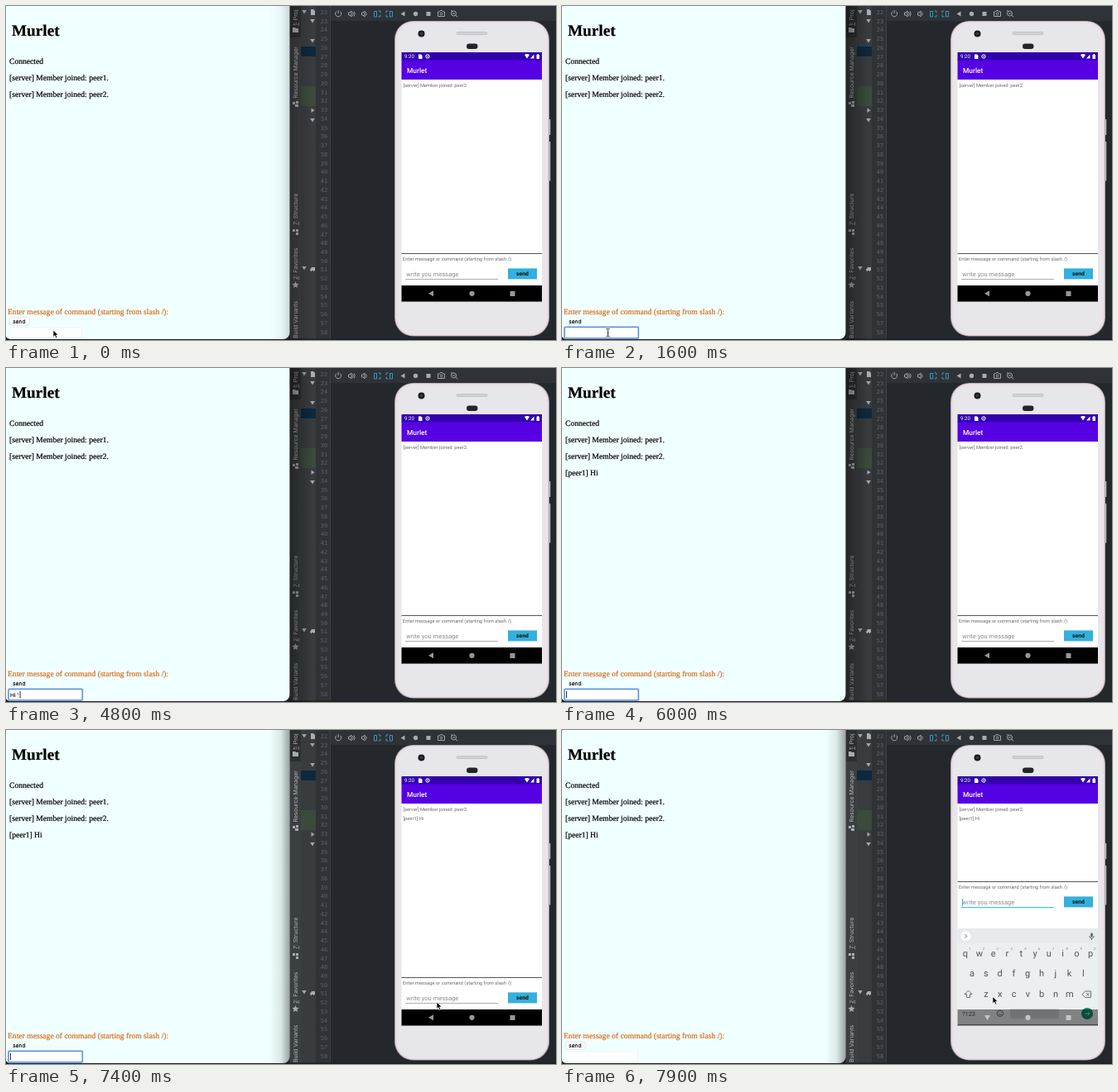
Animation of 664x404 px, one loop 8000 ms. Source, as an HTML page:

```html
<!DOCTYPE html>
<html lang="en">
<head>
<meta charset="utf-8">
<title>Chat demo</title>
<style>
html, body { margin: 0; width: 100%; height: 100%; overflow: hidden; background: #1d1f22; }
svg { display: block; width: 664px; height: 404px; }
text { white-space: pre; text-rendering: geometricPrecision; }
.serif { font-family: "Liberation Serif", "Times New Roman", serif; font-size: 9.6px; fill: currentColor; stroke: currentColor; stroke-width: .22px; }
.ui { font-family: Inter, sans-serif; font-size: 6.6px; stroke: #000; stroke-width: .12px; }
.side { font-family: Inter, sans-serif; font-size: 7px; fill: #b4b7b9; }
.num { font-family: "DejaVu Sans Mono", monospace; font-size: 6.8px; fill: #606468; text-anchor: end; }
.phone { font-family: Roboto, sans-serif; font-size: 5.8px; fill: #6b6b6b; }
.key { font-family: Roboto, sans-serif; font-size: 11px; fill: #4f5358; text-anchor: middle; }
.hint { font-family: Roboto, sans-serif; font-size: 4.2px; fill: #80868b; text-anchor: middle; }
</style>
</head>
<body>
<svg id="stage" viewBox="0 0 664 404">
  <defs>
    <linearGradient id="leftShade">
      <stop offset="0" stop-color="#000" stop-opacity="0"/>
      <stop offset=".55" stop-color="#000" stop-opacity=".09"/>
      <stop offset="1" stop-color="#000" stop-opacity=".38"/>
    </linearGradient>
    <linearGradient id="rightShade">
      <stop offset="0" stop-color="#000" stop-opacity=".42"/>
      <stop offset="1" stop-color="#000" stop-opacity="0"/>
    </linearGradient>
    <clipPath id="screenClip"><rect x="477.5" y="56" width="169.5" height="301.5"/></clipPath>
    <clipPath id="pageClip"><path d="M0 0H342.500V395a8 8 0 0 1-8 8H5a6 6 0 0 1-5-3Z"/></clipPath>
  </defs>

  <g id="ide">
    <rect x="342" width="322" height="404" fill="#24282c"/>
    <rect x="391" width="273" height="18" fill="#2f3236"/>
    <rect x="342" width="14" height="404" fill="#3c3f41"/>
    <rect x="342" width="14" height="38" fill="#2d2f31"/>
    <rect x="356" width="18" height="404" fill="#393c3f"/>
    <rect x="356" y="49" width="18" height="12" fill="#0d293e"/>
    <rect x="356" y="97" width="18" height="24" fill="#3b4a3b"/>
    <rect x="374" width="17.5" height="404" fill="#303335"/>
    <rect x="391" width="1" height="404" fill="#3e4144"/>
    <rect x="342" y="402.5" width="322" height="1.5" fill="#1d1f22"/>
  </g>

  <g id="tools" fill="none" stroke="#a9acaf" stroke-width=".95">
    <path d="M399 6.600a3.500 3.500 0 1 0 4.400 0M401.200 5v4"/>
    <path d="M413.500 8v3h1.500l2 2v-7l-2 2ZM418.500 7.500q1.500 2 0 4M420 6.500q2.500 3 0 6"/>
    <path d="M429.500 8v3h1.500l2 2v-7l-2 2ZM434.500 7.500q1.500 2 0 4"/>
    <g stroke="#3a9cc4">
      <path d="M444.500 6.500h3v6.500h-3ZM449.500 6h2.500v2.500M452 10.500v2.500h-2.500"/>
      <path d="M463.500 6.500h3v6.500h-3ZM461.500 6h-2.500v2.500M459 10.500v2.500h2.500"/>
    </g>
    <g fill="#a9acaf" stroke="none">
      <path d="M481.500 6.500v6l-5-3Z"/>
      <circle cx="494.500" cy="9.500" r="2.700"/>
      <rect x="507.500" y="7" width="5" height="5"/>
    </g>
    <path d="M521.500 7h2l1-1.500h2l1 1.500h2v5.500h-8Z"/><circle cx="525.500" cy="9.500" r="1.300"/>
    <circle cx="540.500" cy="9" r="3"/><path d="M542.800 11.300l2.500 2M539 9h3M537 5.500l2 1"/>
  </g>

  <g id="body">
    <path d="M655 137h2.200v19H655ZM655 164h2.200v47.500H655Z" fill="#c6c2c8"/>
    <rect x="469" y="18" width="187" height="381.500" rx="22.500" fill="#a8a2a9"/>
    <rect x="470" y="18.700" width="185" height="380" rx="21.700" fill="#e9dce2"/>
    <rect x="472" y="20.500" width="181" height="376.500" rx="20" fill="#e7e7eb"/>
    <circle cx="501.500" cy="33.500" r="4" fill="#1c1d22"/>
    <circle cx="501.500" cy="33.500" r="1.500" fill="#3d4150"/>
    <rect x="544" y="31.500" width="37" height="3" rx="1.500" fill="#d3d2d6" stroke="#b3b2b7" stroke-width=".6"/>
    <rect x="556" y="45.500" width="13.500" height="6.500" rx="3.200" fill="#24252a"/>
  </g>

  <g clip-path="url(#screenClip)">
    <rect x="477" y="56" width="171" height="302" fill="#fff"/>
    <rect x="477" y="56" width="171" height="10" fill="#3200ad"/>
    <rect x="477" y="65.400" width="171" height="23.600" fill="#5600e4"/>
    <g fill="#fff">
      <path d="M498 58.500h3l1.500 1.500v4H498Z"/>
      <circle cx="509" cy="61" r="2.200" fill="none" stroke="#fff"/><circle cx="509" cy="61" r=".8"/>
      <path d="M626 59q3-2 6 0l-3 4.500ZM633 63.500h4.500v-5ZM640.500 59h1v-1h1.500v1h1v5h-3.500Z"/>
    </g>
    <g id="chat"></g>
    <g id="form"></g>
    <g id="keys"></g>
    <rect id="navBar" x="477" y="338" width="171" height="20"/>
    <g id="nav" fill="#969799">
      <path id="back"/>
      <circle cx="562.500" cy="347.800" r="3.100"/>
      <rect x="608.500" y="345" width="6" height="6"/>
    </g>
    <rect x="477" y="356.500" width="171" height="1" fill="#111"/>
  </g>

  <g id="web">
    <path d="M0 394H342.500V404H0Z" fill="#1d1f22"/>
    <g clip-path="url(#pageClip)">
      <rect width="343" height="404" fill="#f0ffff"/>
      <g id="page"></g>
      <rect id="button" x="4" y="377" width="24" height="9" rx="2" fill="#fff" stroke="#c6d0d0" stroke-width=".5"/>
      <rect x="4" y="389" width="87.500" height="12" fill="#fff" stroke="#e1eaea" stroke-width=".5"/>
      <rect id="ring" x="3" y="388.300" width="89.300" height="13.500" rx="1" fill="#fff" stroke="#6495e6" stroke-width="1.700"/>
      <rect id="caret" y="391" width=".9" height="8.200" fill="#111"/>
      <rect id="shadeL" x="318" width="25" height="404" fill="url(#leftShade)"/>
    </g>
    <rect id="shadeR" x="342.500" width="27" height="404" fill="url(#rightShade)"/>
  </g>

  <path id="arrow" d="M0 0V8.400L2 6.600L3.400 9.700L4.900 9L3.500 6H6.100Z" fill="#000" stroke="#fff" stroke-width=".7"/>
  <path id="beam" d="M-2-4.700Q0-4.700 0-3.500Q0-4.700 2-4.700M0-3.500V4M-2 5Q0 5 0 3.800Q0 5 2 5M-1 1H1" fill="none" stroke="#222" stroke-width=".9"/>
</svg>
<script>
const NS = "http://www.w3.org/2000/svg";
const LOOP = 8000, STEP = 100, LIFT = -116;
const $ = id => document.getElementById(id);

function add(parent, tag, attrs) {
  const el = document.createElementNS(NS, tag);
  for (const k in attrs) el.setAttribute(k, attrs[k]);
  return parent.appendChild(el);
}
function label(parent, x, y, str, cls, extra) {
  const el = add(parent, "text", { x, y, class: cls, ...extra });
  el.textContent = str;
  return el;
}
const show = (el, on) => el.setAttribute("visibility", on ? "visible" : "hidden");
const place = (el, x, y) => el.setAttribute("transform", `translate(${x} ${y})`);

// Latest value whose start time has passed
const latest = (list, t) => list.filter(k => k[0] <= t).pop();
const during = (t, a, b) => t >= a && t < b;

// Web page
const page = $("page");
label(page, 7, 36.2, "Murlet", "serif", { style: "font-size:19.2px;font-weight:bold" });
label(page, 4, 69.5, "Connected", "serif");
label(page, 4, 89.8, "[server] Member joined: peer1.", "serif");
label(page, 4, 110, "[server] Member joined: peer2.", "serif");
const webHi = label(page, 4, 130, "[peer1] Hi", "serif");
label(page, 2, 373, "Enter message of command (starting from slash /):", "serif", { style: "color:#d9701f" });
const web = $("caret").parentNode;
label(web, 8.2, 384, "send", "ui");
const typed = label(web, 5, 397.8, "", "ui");

// Side bar and gutter
const ide = $("ide");
[["1: Proj", 24], ["Resource Manager", 111.5], ["7: Structure", 265],
 ["2: Favorites", 331], ["Build Variants", 402]].forEach(([s, y]) => {
  label(ide, 0, 0, s, "side", { transform: `translate(352 ${y}) rotate(-90)` });
  if (/^\d/.test(s)) add(ide, "rect", { x: 353, y: y - 4, width: .6, height: 4, fill: "#b4b7b9" });
});
["M346 26h3l1 1h3v5h-7Z", "M346 116h3v3h-3ZM350 115h3v3h-3ZM349 119h4v3h-4Z",
 "M346 270h3v3h-3ZM350 270h3v3h-3ZM350 274h3v3h-3Z",
 "M349.500 333l1.200 2.800 3 .2-2.300 2 .7 3-2.600-1.600-2.600 1.600.7-3-2.300-2 3-.2Z",
 "M368 4h3l2 2v5h-5Z", "M367 319l2-3h4v4h-1v1h-1v-1h-2v1h-1Z"]
  .forEach(d => add(ide, "path", { d, fill: "#a9adb0" }));
[[360, 7], [370, 18], [370, 42], [370, 138], [360, 317]]
  .forEach(([x, y]) => add(ide, "path", { d: `M${x - 2.8} ${y - 2}h5.600l-2.800 4.500Z`, fill: "#a2a6a9" }));
add(ide, "path", { d: "M368.500 123.500v5.600l4-2.800Z", fill: "#a2a6a9" });
for (let n = 22; n <= 58; n++) label(ide, 388, 10 + (n - 22) * 10.74, n, "num");

// Phone app
const chat = $("chat"), form = $("form");
label(chat, 481, 63.2, "9:20", "phone", { style: "font-size:6.2px;fill:#fff" });
label(chat, 484, 80.6, "Murlet", "phone", { style: "font-size:8.4px;font-weight:500;fill:#fff" });
label(chat, 479.5, 97.6, "[server] Member joined: peer2.", "phone");
const phoneHi = label(chat, 479.5, 109.2, "[peer1] Hi", "phone");
add(form, "rect", { x: 477, y: 299, width: 171, height: 1, fill: "#555" });
label(form, 479, 307.6, "Enter message or command (starting from slash /):", "phone");
label(form, 483.3, 327.1, "write you message", "phone", { style: "font-size:7.55px;fill:#8b8b8b" });
const line = add(form, "rect", { x: 482, y: 330, width: 112 });
const mark = add(form, "rect", { x: 483, y: 320, width: 1, height: 9, fill: "#12c9b0" });
add(form, "rect", { x: 606, y: 317.4, width: 35, height: 13, fill: "#33b0dc" });
label(form, 623.5, 326.4, "send", "phone", { style: "font-size:6.8px;font-weight:700;fill:#111;text-anchor:middle" });

// Keyboard, drawn at its resting place
const keys = $("keys");
add(keys, "rect", { x: 477, y: 222, width: 171, height: 140, fill: "#eceff1" });
add(keys, "rect", { x: 477, y: 222, width: 171, height: 18, fill: "#e6eaed" });
add(keys, "circle", { cx: 487.5, cy: 231.3, r: 6, fill: "#fff" });
const outline = d => add(keys, "path", { d, fill: "none", stroke: "#5f6368", "stroke-width": .9 });
outline("M486.500 229l2.200 2.300-2.200 2.300");
outline("M636.800 231q0 3 2.700 3t2.700-3M639.500 234v2");
add(keys, "rect", { x: 638.2, y: 227.5, width: 2.6, height: 5, rx: 1.3, fill: "#5f6368" });
[["qwertyuiop", 487, 256], ["asdfghjkl", 495, 280.2], ["zxcvbnm", 512, 304.8]].forEach(([row, x, y], r) => {
  [...row].forEach((c, i) => {
    label(keys, x + i * 16.8, y, c, "key");
    if (!r) label(keys, x + i * 16.8 + 5.2, 248.3, (i + 1) % 10, "hint");
  });
});
outline("M490.500 297l4.500 4.500h-2.500v4h-4v-4h-2.500Z");
outline("M631.500 298h7v7.500h-7l-3.500-3.750ZM633 300l3.500 3.500M636.500 300l-3.500 3.500");
label(keys, 491, 327.6, "?123", "key", { style: "font-size:7.4px" });
outline("M525.200 324.800a3.700 3.700 0 1 0 7.400 0a3.700 3.700 0 1 0-7.400 0M527 325.500q2 2.500 4 0M527.300 323.500h.8M529.700 323.500h.8");
add(keys, "rect", { x: 541, y: 319, width: 59, height: 12, rx: 1.5, fill: "#cfd4d8" });
add(keys, "circle", { cx: 634, cy: 325, r: 7, fill: "#0f8a6e" });
add(keys, "path", { d: "M631 325h6m-2.300-2.300l2.300 2.300-2.300 2.300", fill: "none", stroke: "#d5dcda", "stroke-width": .9 });

const typing = [[0, "", 5], [2300, "H", 10.6], [2800, "Hi", 11.9], [4000, "Hi ", 13.7],
  [4800, "Hi '", 16.6], [5800, "Hi ", 13.7], [6000, "", 5]];
const blinkOn = [[1100, 1600], [2100, 3400], [3900, 4500], [4800, 5300], [5800, 6500], [7000, 7500]];
const slide = [[0, 140], [7700, 74], [7800, 42], [7900, 18]];
const dim = [[0, 1], [7700, .9], [7800, .65], [7900, .46]];
// Strength of the shadow cast over the web page; the other side gets the rest
const shade = [[0, .4], [100, .2], [200, 0], [7200, .4], [7300, .8], [7400, 1]];

function pointer(t) {
  if (t < 300) return ["arrow", 57, 392];
  if (t < 800) return ["beam", 55.3, 391];
  if (t < 2300) return ["beam", 55.5, t < 900 ? 393 : 395];
  if (t < 6400) return ["none", 0, 0];
  if (t < 6500) return ["beam", 57, 394];
  const p = Math.min(1, (t - 6400) / 600), e = p * p * (3 - 2 * p);
  const rise = Math.min(1, Math.max(0, (t - 7400) / 300));
  return ["arrow", 57 + 463 * e, 394 - 65 * e - 6.5 * rise];
}

function draw(time) {
  const t = Math.floor((time % LOOP) / STEP) * STEP;
  const focused = during(t, 1100, 7600);
  const tapped = t >= 7600, open = t >= 7700;

  const [, str, cx] = latest(typing, t);
  typed.textContent = str;
  $("caret").setAttribute("x", cx);
  show($("caret"), blinkOn.some(([a, b]) => during(t, a, b)));
  show($("ring"), focused);
  show($("button"), !focused);
  const cast = latest(shade, t)[1];
  $("shadeL").setAttribute("opacity", cast);
  $("shadeR").setAttribute("opacity", 1 - cast);
  show(webHi, t >= 6000);
  show(phoneHi, t >= 6100);

  place(form, 0, open ? LIFT : 0);
  line.setAttribute("height", tapped ? 1.2 : .8);
  line.setAttribute("fill", tapped ? "#2fd5bd" : "#999");
  show(mark, tapped);
  show(keys, open);
  place(keys, 0, latest(slide, t)[1]);
  $("navBar").setAttribute("opacity", latest(dim, t)[1]);
  $("nav").setAttribute("fill", open ? "#c3c6c8" : "#969799");
  $("back").setAttribute("d", open ? "M510 345h7l-3.500 6Z" : "M516 344.300v7l-6-3.500Z");

  const [kind, x, y] = pointer(t);
  ["arrow", "beam"].forEach(id => {
    show($(id), id === kind);
    place($(id), x, y);
  });
}

const start = performance.now();
function tick() {
  draw(performance.now() - start);
  requestAnimationFrame(tick);
}
tick();
</script>
</body>
</html>
```
